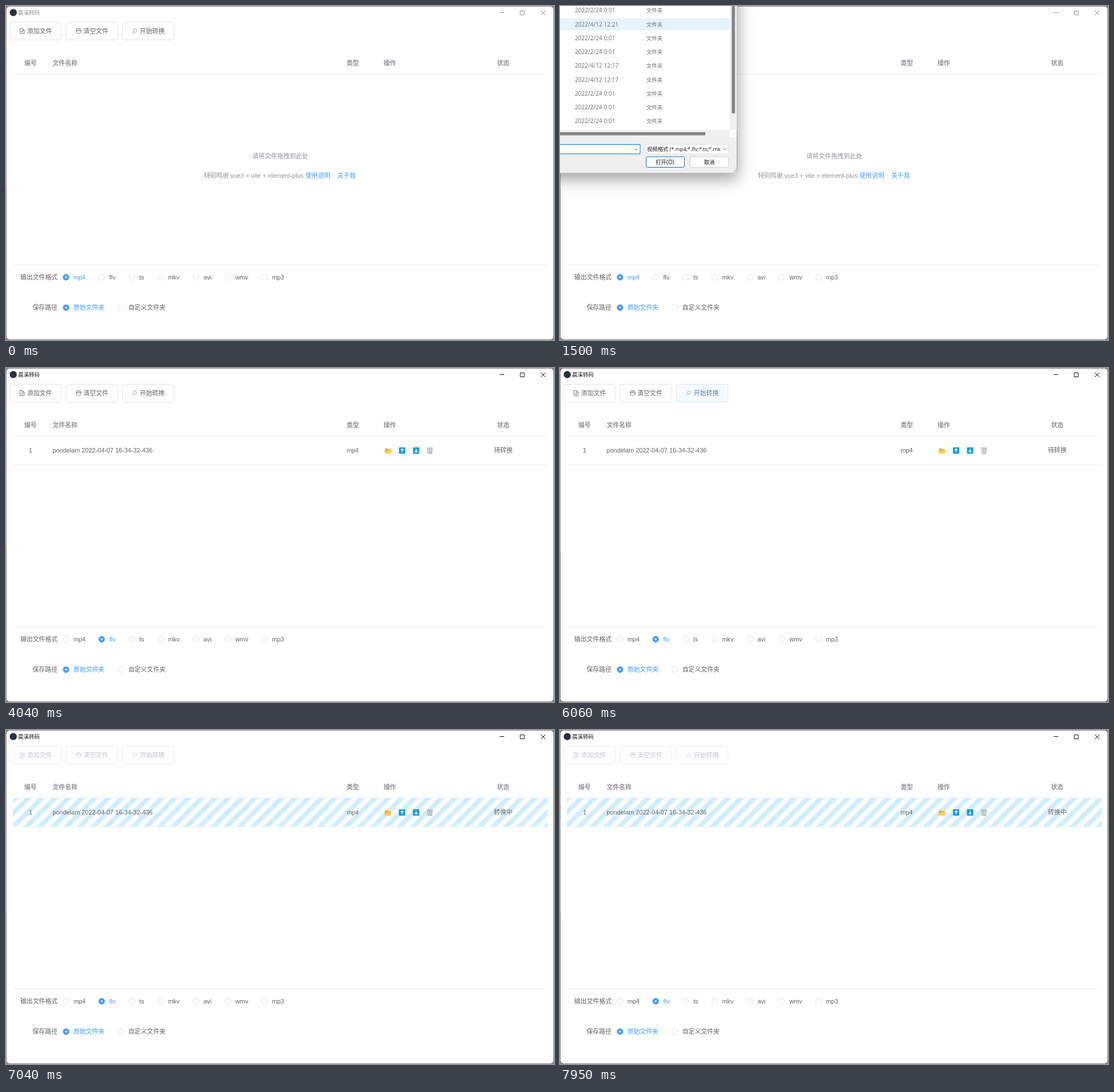
An HTML page for the animation above (8000 ms loop, 958 by 585 pixels).

```html
<!DOCTYPE html>
<html lang="zh-CN">
<head>
<meta charset="utf-8">
<title>晨溪转码</title>
<style>
  html, body { margin: 0; width: 100%; height: 100%; overflow: hidden; background: #8b8281; }
  svg { display: block; font-family: "Liberation Sans", "Noto Sans CJK SC", "Noto Sans CJK", sans-serif; }
  text { white-space: pre; }
  #dialog { font-family: "Open Sans", "Noto Sans CJK SC", "Noto Sans CJK", sans-serif; color: #333; }
  #panel { filter: drop-shadow(0 10px 14px rgba(0, 0, 0, .38)); }
</style>
</head>
<body>
<svg id="stage" width="958" height="585" viewBox="0 0 958 585"></svg>
<script>
const LOOP = 8000, TICK = 70, STRIPE = 23.3;
const GREY = '#606266', BLUE = '#409eff', CLIP = 'pondelam 2022-04-07 ';

// ---------- markup helpers (y is the visual middle of a text line) ----------
const text = (x, y, s, attrs = '', size = 10.88) =>
  `<text x="${x}" y="${y + size * .36}" font-size="${size}" ${attrs}>${s}</text>`;
const label = (x, y, s, attrs = '', latin = 10.1) =>
  text(x, y, s.replace(/[ -~]+/g, m => `<tspan font-size="${latin}">${m}</tspan>`), attrs, 9.33);
const rect = (x, y, w, h, fill, attrs = '') =>
  `<rect x="${x}" y="${y}" width="${w}" height="${h}" fill="${fill}" ${attrs}/>`;
const line = (d, color = 'currentColor', width = 1) =>
  `<path d="${d}" fill="none" stroke="${color}" stroke-width="${width}"/>`;
const group = (id, ...parts) => `<g id="${id}">${parts.join('')}</g>`;
const rule = y => line(`M12 ${y}H947`, '#ebeef5');
const END = 'text-anchor="end"', MID = 'text-anchor="middle"';

// ---------- main window ----------
const sparkle = [...Array(8)].map((_, i) => {
  const c = Math.cos(i * Math.PI / 4), s = Math.sin(i * Math.PI / 4), reach = i === 3 ? 7 : 4;
  return `M${225.5 + 2 * c} ${43.2 + 2 * s}L${225.5 + reach * c} ${43.2 + reach * s}`;
}).join('');
const buttons = [
  { id: 'add', x: 6.5, name: '添加文件',
    icon: 'M24.5 39.5h4.5l3 3v6h-7.500zM29 39.500v3h3M28.200 43v4M26.200 45h4' },
  { id: 'clear', x: 105, name: '清空文件',
    icon: 'M123.500 43.500v-2.500q0-1.500 1.500-1.500h4q1.500 0 1.500 1.500v2.500M122 43.500h10M123 43.500v2.500q0 1 1.500 1.500l2.500 1 2.500-1q1.500-.5 1.500-1.500v-2.500M125 41.500h4' },
  { id: 'start', x: 203.5, name: '开始转换', icon: sparkle }
];
const button = b => group(b.id,
  rect(b.x, 28.5, 90, 31, '#fff', 'rx="3" stroke-width=".8"'),
  line(b.icon, 'currentColor', .8),
  text(b.x + 30.3, 44, b.name, 'fill="currentColor"'));

const radio = (x, y, name, labelX, on, id = '') => `<g id="${id}">
  <circle cx="${x}" cy="${y}" r="5.2" fill="${on ? BLUE : '#fff'}" stroke="${on ? BLUE : '#dcdfe6'}" stroke-width=".8"/>
  <circle cx="${x}" cy="${y}" r="${on ? 1.7 : 0}" fill="#fff"/>
  ${text(labelX, y, name, `fill="${on ? BLUE : GREY}"`)}</g>`;

const folder = (x, y) =>
  `<path d="M${x - 5.5} ${y - 4}h4l1.500 1.500h5v7h-10.500z" fill="#f0a51e"/>
   <path d="M${x - 3.5} ${y - 1}h9.500l-1.500 5.500h-10z" fill="#ffcf48"/>`;
const arrowBox = (x, dir) => rect(x - 5.5, 139, 11, 11, '#0a9bea', 'rx="1"') +
  line(`M${x} ${144.5 + 3 * dir}v${-6 * dir}M${x - 2.5} ${144.5 + .6 * dir}l2.500 ${2.4 * dir}l2.500 ${-2.4 * dir}`, '#fff', 1.4);
const bin = line('M735.500 139.800h11M736.500 141l1 9h7l1-9zM739 141l3 9M742 141l-3 9M744 141l-1 9M738 144h6M738 147h6',
  '#9a9da1', .8);

const mainWindow = [
  rect(.5, .5, 957, 584, '#fff', 'rx="6" stroke="#807a79"'),
  line('M.5 8V320', '#ab9490'),
  '<circle cx="12.700" cy="11.500" r="6.200" fill="#2b2e3b"/>',
  group('chrome',
    text(21.3, 11.3, '晨溪转码', 'fill="currentColor"', 9.4),
    line('M863 11.500h8M899 8.500h7v7h-7zM935 8l8 8M943 8l-8 8')),
  ...buttons.map(button),
  ...[[32, '编号'], [81.5, '文件名称'], [595.5, '类型'], [660, '操作'], [858.5, '状态']]
    .map(([x, s]) => text(x, 100, s, 'fill="#909399" font-weight="700"')),
  rule(119.5),
  group('hint',
    text(430.5, 263, '请将文件拖拽到此处', 'fill="#909399"'),
    text(346, 297, '特别鸣谢:vue3 + vite + element-plus', 'fill="#909399"'),
    text(523.5, 297, '使用说明', `fill="${BLUE}"`),
    text(579, 297, '关于我', `fill="${BLUE}"`)),
  group('row',
    rect(12, 119, 935, 50, 'url(#stripes)', 'id="busy"'),
    rule(169.5),
    text(43, 144, '1', `fill="${GREY}" ${MID}`),
    text(81.5, 144, CLIP + '16-34-32-436', `fill="${GREY}"`),
    text(595.5, 144, 'mp4', `fill="${GREY}"`),
    folder(668, 145), arrowBox(692.5, -1), arrowBox(717, 1), bin,
    text(853, 144, '待转换', `id="status" fill="${GREY}"`)),
  rule(453.5),
  text(25, 475, '输出文件格式', `fill="${GREY}"`),
  ...[[105, 'mp4', 118], [167.3, 'flv', 180.5], [220, 'ts', 233], [270.7, 'mkv', 283.5],
    [332, 'avi', 345.3], [387.8, 'wmv', 401], [451.7, 'mp3', 465]]
    .map(([x, s, lx]) => radio(x, 475, s, lx, false, 'opt-' + s)),
  text(46.5, 528, '保存路径', `fill="${GREY}"`),
  radio(105, 528.3, '原始文件夹', 117.8, true),
  radio(200.7, 528.3, '自定义文件夹', 213.7, false)
].join('');

// ---------- file dialog ----------
const chevron = (x, y, w = 3) => line(`M${x - w} ${y - w / 2}l${w} ${w}l${w} ${-w}`, '#444', .9);
const crumb = x => line(`M${x} 98l2 2.200l-2 2.200`);

const fileIcon = (i, names) => {
  const x = 88 + 85.5 * i;
  return `<path d="M${x} 150.500h49.500l14 14V224h-63.500z" fill="#fff" stroke="#ef8670"/>
    <path d="M${x + 49.5} 150.500v14h14" fill="#fff" stroke="#ef8670"/>
    <circle cx="${x + 32}" cy="177" r="15.500" fill="#ef8670"/>
    ${rect(x - .5, 202, 64.5, 22.5, '#ef826b')}
    ${text(x + 32, 213.2, 'MP4', `fill="#fff" ${MID} font-family="DejaVu Sans, sans-serif"`, 16.8)}
    ${names.map((s, n) => label(x + 32, 231 + 12.3 * n, s, `fill="#111" ${MID}`)).join('')}`;
};
const takes = ['14-50-32-431.', '14-51-21-479.', '14-55-24-209.', '16-34-32-436.'];

const navItems = [[10.5, '此电脑'], [7, '视频'], [7, '图片'], [7, '文档'], [7, '下载'], [7, '音乐'], [7, '桌面'],
  [32.5, 'Win10 (C:)'], [25.5, '数据 (D:)']];

const dates = ['2/24 0:01', '4/12 12:21', '2/24 0:01', '2/24 0:01', '4/12 12:17', '4/12 12:17',
  '2/24 0:01', '2/24 0:01', '2/24 0:01'];
const listView = group('list',
  rect(66, 143, 515, 247, '#fff'),
  rect(66, 194.5, 514, 21, '#e5f3ff'),
  dates.map((d, i) => label(310, 181 + 24.25 * i, '2022/' + d, 'fill="#6d6d6d"') +
    label(435, 181 + 24.25 * i, '文件夹', 'fill="#6d6d6d"')).join(''),
  rect(581, 143, 12.5, 247, '#f0f0f0'), rect(584.3, 143, 5.5, 218, '#858585'),
  rect(66, 390, 514, 13, '#f0f0f0'), rect(66, 394, 472, 5.5, '#858585'));

const dialog = group('dialog',
  rect(-320, 58.5, 913.5, 407, '#fff', 'id="panel" rx="6" stroke="#9a9a9a"'),
  label(33.5, 70, '选择视频位置', `fill="#111" ${END}`),
  line('M576.500 66l8 8M584.500 66l-8 8', '#111'),
  chevron(11, 100, 2.3), line('M35.500 105v-9.500M31.200 99.500l4.300-4.300l4.300 4.300'),
  rect(52, 87, 371.5, 26, '#fff', 'stroke="#dcdcdc"'),
  folder(64, 100), crumb(76.5), label(85, 100, '报表系统文件', 'fill="#111"'),
  crumb(148), label(156.5, 100, '操作视频展示', 'fill="#111"'),
  chevron(382, 100.5, 4),
  line('M413 97.500a4.500 4.500 0 1 0 .8 3M413.500 95v3h-3'),
  rect(430.5, 87, 156, 26, '#fff', 'stroke="#dcdcdc"'),
  label(435.5, 100, '搜索"操作视频展示"', 'fill="#6d6d6d"'),
  line('M568 104l2.500-2.800M570.200 99a2.600 2.600 0 1 1 5.200 0a2.600 2.600 0 1 1-5.200 0'),
  rect(-319, 119, 912, 24.5, '#f4f8fc'),
  label(9, 131, '新建文件夹', 'fill="#1d4468"'),
  line('M503.500 127h8.500v7.500h-8.500zM503.500 136h8.500'),
  '<path d="M520 130h5l-2.500 2.800z" fill="#222"/>',
  rect(541.5, 127, 11, 9, '#fff', 'stroke="#5f7f9c"'), rect(547.5, 127, 5, 9, '#3b9be0'),
  '<circle cx="575" cy="131" r="6.200" fill="#0078d4"/>', text(575, 131, '?', `fill="#fff" font-weight="700" ${MID}`, 9),
  rect(-319, 352, 370, 21.5, '#d9d9d9'),
  navItems.map(([x, s], i) => label(x, 164.3 + 24.75 * i, s, `fill="#111" ${END}`)).join(''),
  label(1.5, 394, '网络', `fill="#0078d4" ${END}`),
  rect(52.5, 143.5, 13, 260, '#f0f0f0'), rect(55.8, 277, 5.7, 100, '#858585'),
  rect(336.5, 149.5, 80.5, 127, '#cce8ff', 'id="pick" stroke="#99d1ff"'),
  takes.map((s, i) => fileIcon(i, [CLIP.slice(0, 8), '2022-04-07', s, 'mp4'])).join(''),
  fileIcon(4, ['上报数据校验.', 'mp4']),
  listView,
  '<path d="M-319 403H593V460q0 5.500-5.500 5.500H-319z" fill="#f0f0f0"/>',
  label(94, 423.5, '文件名(N):', `fill="#111" ${END}`),
  rect(97.5, 415.5, 326.5, 16.5, '#fff', 'id="field"'),
  label(99.5, 423.5, CLIP + '16-34-32-436.mp4', 'id="fileName" fill="#111"'),
  chevron(417, 423.8, 2.5),
  rect(434, 415.5, 144.5, 16.5, '#fff', 'stroke="#e3e3e3"'),
  `<g clip-path="url(#filterClip)">${label(436, 423.5, '视频格式 (*.mp4;*.flv;*.ts;*.mkv', 'fill="#111"', 9)}</g>`,
  chevron(572, 423.8, 2.5),
  rect(434.5, 437, 67, 18.5, '#fdfdfd', 'rx="2" stroke="#0078d4"'),
  label(467.5, 446.3, '打开(O)', `fill="#111" ${MID}`),
  rect(511.5, 437, 67, 18.5, '#fdfdfd', 'rx="2" stroke="#d0d0d0"'),
  label(545, 446.3, '取消', `fill="#111" ${MID}`),
  line('M592 459l-5 5M592 462l-2 2', '#a5a5a5'));

const $ = id => document.getElementById(id);
const tile = STRIPE / Math.SQRT2;
$('stage').innerHTML = `<defs>
  <pattern id="stripes" patternUnits="userSpaceOnUse" width="${tile}" height="${tile}">${rect(0, 0, tile / 2, tile, '#d0edff')}</pattern>
  <clipPath id="filterClip">${rect(434, 415, 131, 18)}</clipPath></defs>` + mainWindow + dialog;

// ---------- animation ----------
const within = (t, a, b) => t >= a && t < b;
// rises from 0 to 1 in n held ticks, the first one at `start`
const ramp = (t, start, n) => Math.min(1, Math.max(0, Math.floor((t - start) / TICK) + 1) / n);
const mix = (a, b, k) => '#' + [1, 3, 5].map(i => {
  const p = parseInt(a.substr(i, 2), 16), q = parseInt(b.substr(i, 2), 16);
  return Math.round(p + (q - p) * k).toString(16).padStart(2, '0');
}).join('');
const set = (el, attrs) => { for (const k in attrs) el.setAttribute(k, attrs[k]); };
const show = (id, on) => set($(id), { display: on ? 'inline' : 'none' });

function paintButton(id, hover, pressed, disabled) {
  const g = $(id);
  g.style.color = mix(mix(GREY, BLUE, hover), '#c0c4cc', disabled);
  set(g.firstElementChild, {
    fill: mix(mix('#ffffff', '#ecf5ff', hover), '#ffffff', disabled),
    stroke: pressed ? BLUE : mix(mix('#dcdfe6', '#c6e2ff', hover), '#e8ebf2', disabled)
  });
}

function paintRadio(id, k) {
  const [ring, dot, name] = $(id).children;
  set(ring, { fill: mix('#ffffff', BLUE, k), stroke: mix('#dcdfe6', BLUE, k) });
  set(dot, { r: 1.7 * k });
  set(name, { fill: mix(GREY, BLUE, k) });
}

function render(t) {
  const active = within(t, 940, 1290) || t >= 3050;
  $('chrome').style.color = active ? '#111' : '#8e8e8e';

  const off = ramp(t, 6550, 2);
  const addHover = t < 1290 ? ramp(t, 580, 2) : t >= 3190 ? 1 - ramp(t, 3760, 3) : 0;
  const startHover = within(t, 440, 510) ? .5 : ramp(t, 6060, 2);
  paintButton('add', addHover, within(t, 940, 1080), off);
  paintButton('clear', within(t, 510, 580) ? .5 : 0, false, off);
  paintButton('start', startHover, within(t, 6340, 6410), off);

  const hasFile = t >= 3190, busy = t >= 6550;
  show('hint', !hasFile);
  show('row', hasFile);
  show('busy', busy);
  $('status').textContent = busy ? '转换中' : '待转换';
  // the stripes advance by one period per second
  const shift = 10.3 + STRIPE * (t - 7040) / 1000;
  set($('stripes'), { patternTransform: `translate(${shift} 119) rotate(45)` });

  const swap = ramp(t, 3760, 5);
  paintRadio('opt-mp4', 1 - swap);
  paintRadio('opt-flv', swap);

  const opening = t < 1570;
  show('dialog', within(t, 1290, 3190));
  set($('dialog'), {
    opacity: ramp(t, 1290, 3) - ramp(t, 2980, 3),
    transform: opening ? 'translate(-284 -173)' : 'translate(0 0)'
  });
  show('list', opening);
  show('pick', t >= 1730);
  const picked = t >= 2790;
  set($('pick'), { fill: picked ? '#cce8ff' : '#e5f3ff', stroke: picked ? '#99d1ff' : '#e5f3ff' });
  show('fileName', picked);
  set($('field'), { stroke: opening ? '#0078d4' : '#8a8a8a' });
}

const began = performance.now();
(function frame() {
  render((performance.now() - began) % LOOP);
  requestAnimationFrame(frame);
})();
</script>
</body>
</html>
```
